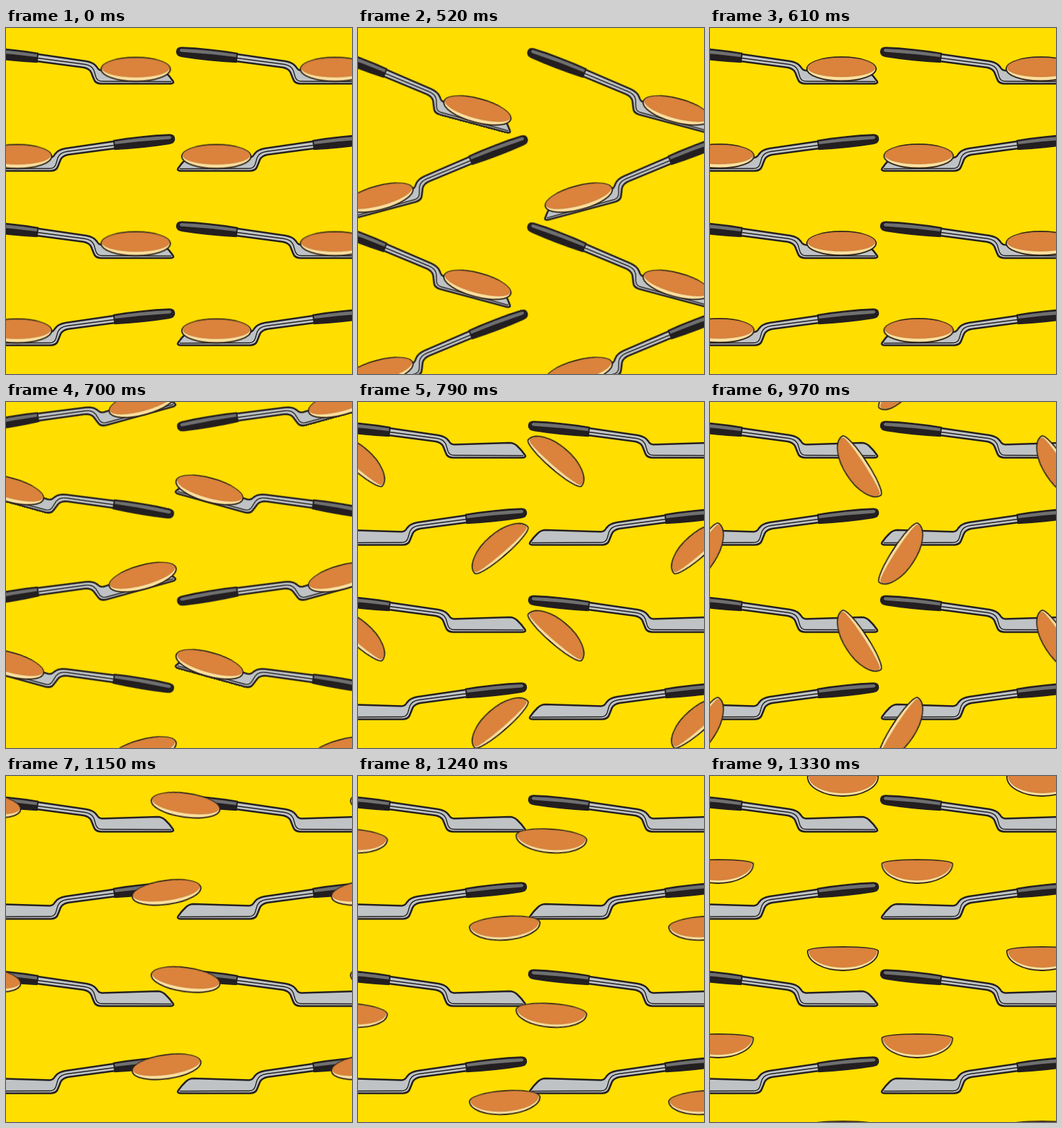
Recreate the animation shown at these times as an HTML page. Size 500x500 px, loop 1.46 s.

```html
<!DOCTYPE html>
<html lang="en">
<head>
<meta charset="utf-8">
<title>Flipping pancakes</title>
<style>
  html, body { margin: 0; width: 100%; height: 100%; overflow: hidden; background: #ffde00; }
  svg { display: block; width: 100%; height: 100%; }

  .spatula, .pancake, .pancake path { animation: 1460ms step-end infinite; }
  .spatula { transform-origin: -36px 35px; animation-name: swing; stroke-linejoin: round; }
  .pancake { animation-name: toss; }
  .pancake .body { animation-name: body; fill: #fbdf9f; stroke: #2b2118; stroke-width: 1.8; }
  .pancake .face { animation-name: face; fill: #db823c; stroke: #c27836; stroke-width: .7; }

  .steel { fill: #bfc3c5; stroke: #231f20; stroke-width: 2.6; }
  .crease { fill: none; stroke: #231f20; stroke-width: 1.4; }
  .grip { fill: #231f20; stroke: #231f20; stroke-width: 1.5; }
  .shine { fill: #6f6f70; }

  @keyframes swing {
    0% { transform: rotate(0deg); }
    35.616% { transform: translate(-1.5px, 1.3px) rotate(15deg); }
    41.78% { transform: rotate(0deg); }
    47.945% { transform: translate(1.5px, 1px) rotate(-15.5deg); }
    54.109%, 100% { transform: rotate(0deg); }
  }
  @keyframes toss {
    0% { transform: translate(187.5px, 59.5px); }
    35.616% { transform: translate(172.5px, 119px) rotate(15deg); }
    41.78% { transform: translate(190px, 59px) rotate(0deg); }
    47.945% { transform: translate(197.5px, 1px) rotate(-15.5deg); }
    54.109% { transform: translate(207px, -38px) rotate(-41deg); }
    60.273% { transform: translate(213px, -112px) rotate(-82deg); }
    66.438% { transform: translate(219px, -160px) rotate(-123deg); }
    72.602% { transform: translate(226px, -138px) rotate(25deg); }
    78.767% { transform: translate(232px, -84px) rotate(-8deg); }
    84.931% { transform: translate(212px, -37px) rotate(-4deg); }
    91.095% { transform: translate(192px, 1px); }
    100% { transform: translate(187.5px, 59.5px); }
  }
  /* Two half ellipses: flat disc, domed in the air, bowl-shaped on the way down. */
  @keyframes body {
    0%, 72.602% { d: path("M-50 0A50 17 0 0 1 50 0A50 17.5 0 0 1-50 0Z"); }
    54.109% { d: path("M-51 0A51 25 0 0 1 51 0A51 9 0 0 1-51 0Z"); }
    84.931% { d: path("M-51 0A51 12 0 0 1 51 0A51 22 0 0 1-51 0Z"); }
    91.095% { d: path("M-51 0A51 6 0 0 1 51 0A51 28 0 0 1-51 0Z"); }
    100% { d: path("M-50 0A50 17 0 0 1 50 0A50 17.5 0 0 1-50 0Z"); }
  }
  @keyframes face {
    0%, 72.602% { d: path("M-48.5-1.5A48.5 14.5 0 0 1 48.5-1.5A48.5 13 0 0 1-48.5-1.5Z"); }
    54.109% { d: path("M-49-1A49 23 0 0 1 49-1A49 5 0 0 1-49-1Z"); }
    84.931% { d: path("M-49-1A49 10 0 0 1 49-1A49 18.5 0 0 1-49-1Z"); }
    91.095% { d: path("M-49-.5A49 4.5 0 0 1 49-.5A49 24 0 0 1-49-.5Z"); }
    100% { d: path("M-48.5-1.5A48.5 14.5 0 0 1 48.5-1.5A48.5 13 0 0 1-48.5-1.5Z"); }
  }
</style>
</head>
<body>
<svg id="stage" viewBox="0 0 500 500"></svg>
<script>
  const spatula = `<g class="spatula">
    <path class="steel" d="M44 37.5L116 48Q127 50 131 56Q134 61.5 139 61.5L219 59Q225 59 230 63.5Q236 69 241.5 77Q243 80 238 80.5L137 80.5Q129 80 127 74L123 64Q120 58.5 112 57L44 48Z"/>
    <path class="crease" d="M46 43.5L114 52.5Q124 54 127 61L130 71Q132 77 139 77L239 77.5"/>
    <path class="grip" d="M-34 28Q5 29.5 46.5 36.5L45 49.5Q5 47.5-33 41.5Q-41.5 40.5-41.5 34.5Q-41.5 28-34 28Z"/>
    <path class="shine" d="M-35 30Q5 31.5 45 38L44.5 42Q5 37-35 34.5Q-39 32.5-35 30Z"/>
  </g>`;
  const pancake = `<g class="pancake">
    <path class="body" d="M-50 0A50 17 0 0 1 50 0A50 17.5 0 0 1-50 0Z"/>
    <path class="face" d="M-48.5-1.5A48.5 14.5 0 0 1 48.5-1.5A48.5 13 0 0 1-48.5-1.5Z"/>
  </g>`;

  // Every tile holds one copy plus its mirror image half a row lower.
  function tile(art, mirrorX) {
    let markup = "";
    for (let row = 0; row < 3; row++) {
      for (let col = -1; col < 3; col++) {
        const x = col * 288, y = row * 252;
        markup += `<g transform="translate(${x} ${y})">${art}</g>
          <g transform="translate(${x + mirrorX} ${y + 126}) scale(-1 1)">${art}</g>`;
      }
    }
    return markup;
  }
  document.getElementById("stage").innerHTML = tile(spatula, 202) + tile(pancake, 203.5);
</script>
</body>
</html>
```
